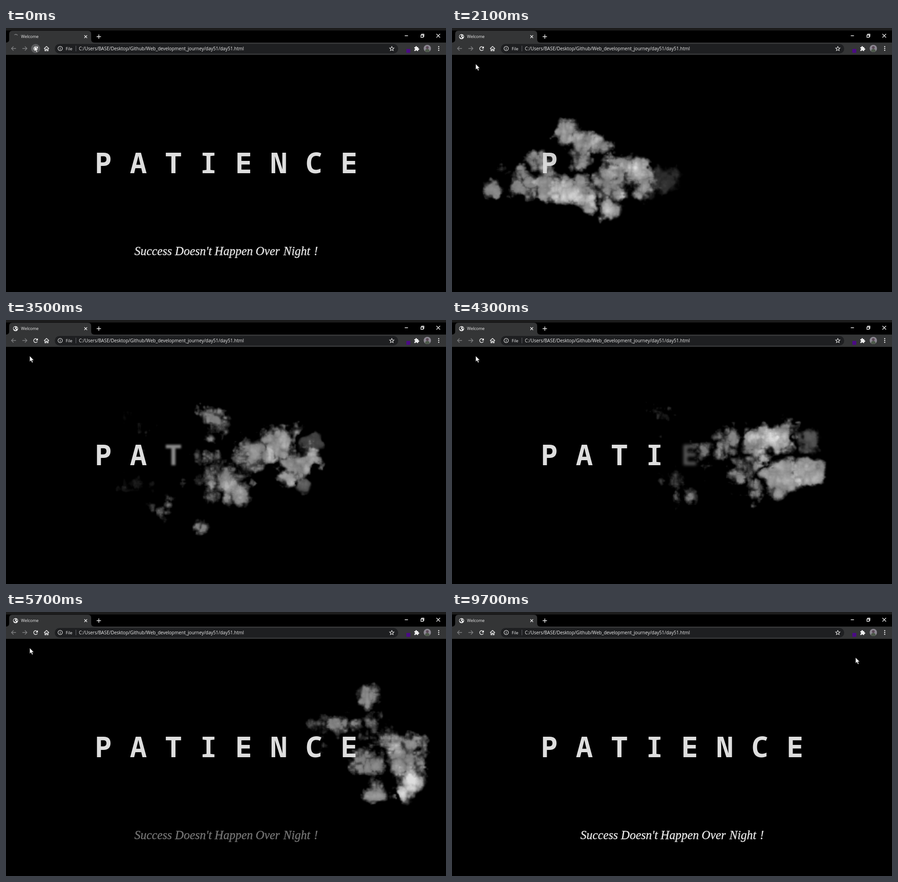
An HTML page with a canvas for the animation above (9.8 s loop, 966x580 px).

```html
<!DOCTYPE html>
<html lang="en">
<head>
<meta charset="utf-8">
<title>Welcome</title>
<style>
  html, body { margin: 0; width: 100%; height: 100%; overflow: hidden; background: #000; }
  canvas { position: absolute; left: 0; top: 130px; width: 966px; height: 350px; }
  svg { position: absolute; left: 0; top: 0; width: 966px; height: 580px; }
  .ui { font: 10px "Open Sans", sans-serif; fill: #eee; }
  .tab { font-size: 9px; font-weight: 500; }
  .line { fill: none; stroke: #eee; stroke-width: 1.4; }
  .dim { stroke: #808183; }
  #word { font: bold 62px "Noto Sans Mono", monospace; fill: #dedede; text-anchor: middle; }
  #tagline { font: italic 26.5px "Liberation Serif", serif; fill: #e6e6e6; stroke: #e6e6e6; stroke-width: .4; }
</style>
</head>
<body>
<canvas id="smoke" width="483" height="175"></canvas>
<svg viewBox="0 0 966 580">
  <g id="word"></g>
  <text id="tagline" y="499"><tspan x="282">Success</tspan> <tspan x="371">Doesn't</tspan> <tspan x="458">Happen</tspan> <tspan x="548">Over</tspan> <tspan x="609">Night</tspan> <tspan x="676">!</tspan></text>

  <g class="ui">
    <path fill="#1c1c1c" d="M0 0H966V5.5H0Z"/>
    <path fill="#343536" d="M0 32Q7 32 7 25V13Q7 6 14 6H180Q187 6 187 13V25Q187 32 194 32H966V59H0Z"/>
    <rect x="107" y="35" width="754" height="21" rx="10.5" fill="#1e1f21"/>

    <path id="spinner" class="line dim" d="M18.500 15.200Q22 12.500 25.500 16"/>
    <g id="globe">
      <circle cx="21" cy="19" r="5.500"/>
      <path fill="#343536" d="M17 16.500l3-1.500 1 2-2 2 3 1-1 3-2-2-2.500-1zM23 16l2 1v3l-2-1z"/>
    </g>
    <text class="tab" x="33" y="22">Welcome</text>
    <path class="line" d="M172 16l6 6m0-6l-6 6M199 19h9.500M203.750 14.300v9.500"/>
    <path class="line" stroke-width="1" d="M875.500 17h7M945 13l8 8m0-8l-8 8M911 15.500h5v5h-5zM912.500 15v-1.500h5v5H916"/>

    <path class="line dim" d="M22 45H12m4.500-4.500L12 45l4.500 4.500M36 45h10m-4.500-4.500L46 45l-4.500 4.500"/>
    <circle id="hover" cx="65" cy="45" r="10" fill="#5c5d5f"/>
    <path class="line" d="M69 43.500A4.300 4.300 0 1 0 69 47"/>
    <path d="M70 40v5h-5z"/>
    <path class="line" d="M83.500 45.500L89 40.500l5.500 5M85.500 44.500V50h2.200v-3.500h2.600V50h2.200v-5.500"/>
    <circle class="line" cx="119" cy="45" r="4.800" style="stroke-width:1.100"/>
    <path class="line" style="stroke-width:1.200" d="M119 44.500v3.200M119 42v1.200"/>
    <text x="131" y="48.500" style="font-size:9.300px">File</text>
    <path stroke="#66676a" d="M153.500 39v12"/>
    <text x="160" y="48.500">C:/Users/BASE/Desktop/Github/Web_development_journey/day51/day51.html</text>

    <path class="line" style="stroke-width:1.100" d="M847 40.500l1.400 3.200 3.500.3-2.700 2.300.8 3.400-3-1.800-3 1.800.8-3.400-2.700-2.300 3.500-.3z"/>
    <rect x="879" y="46" width="8.500" height="8.500" fill="#4b0a86"/>
    <path d="M896.500 42h2.500a1.700 1.700 0 1 1 3.200 0h2.800v2.800a1.700 1.700 0 1 1 0 3.200v2.500h-2.700a1.600 1.600 0 0 0-3.200 0h-2.600v-2.700a1.600 1.600 0 0 0 0-3.200z"/>
    <circle cx="925" cy="45" r="8" fill="#8b8791"/>
    <path fill="#4c5949" d="M920 51q0-5 5-5t5 5a8 8 0 0 1-10 0z"/>
    <circle cx="925" cy="43" r="3" fill="#5b4956"/>
    <circle cx="950" cy="41" r="1.300"/><circle cx="950" cy="45" r="1.300"/><circle cx="950" cy="49" r="1.300"/>
  </g>
  <path id="cursor" fill="#f4f4f4" stroke="#111" stroke-width=".6" d="M0 0V12.500L3 10 5 14.800 7.200 13.900 5.200 9.200H9Z"/>
</svg>
<script>
const LOOP = 9800, STEP = 100;
const $ = id => document.getElementById(id);
const clamp = v => Math.max(0, Math.min(1, v));
const ramp = (t, from, length) => clamp((t - from) / length);

// ---- letters ----
const starts = [1.35, 2.2, 3, 3.5, 4, 4.3, 4.6, 4.9];
const letters = [...'PATIENCE'].map((ch, i) => {
  const el = document.createElementNS('http://www.w3.org/2000/svg', 'text');
  el.setAttribute('x', 213.4 + 77.1 * i);
  el.setAttribute('y', 319);
  el.textContent = ch;
  return $('word').appendChild(el);
});

function drawText(t) {
  const loaded = t < 0.1;
  letters.forEach((el, i) => {
    const p = loaded ? 1 : ramp(t, starts[i], 0.8);
    el.style.opacity = p;
    el.style.filter = p < 1 ? `blur(${5 * (1 - p)}px)` : 'none';
  });
  $('tagline').style.opacity = loaded ? 1 : ramp(t, 5, 1.4);
}

// ---- pointer: time, x, y ----
const pointer = [
  [0, 62, 39], [0.2, 62, 39], [0.8, 52, 79], [7.6, 52, 79], [8, 132, 62],
  [8.5, 780, 34], [9, 888, 95], [9.4, 886, 100], [9.8, 886, 100]
];

function drawPointer(t) {
  const i = pointer.findIndex(k => k[0] > t);
  const [a, b] = [pointer[i - 1], pointer[i]];
  const p = ramp(t, a[0], b[0] - a[0]);
  const at = n => a[n] + (b[n] - a[n]) * p;
  $('cursor').setAttribute('transform', `translate(${at(1)} ${at(2)})`);
  $('hover').style.opacity = t < 0.4 ? 1 : 0;
  $('spinner').style.opacity = t < 0.3 ? 1 : 0;
  $('globe').style.opacity = t < 0.3 ? 0 : 1;
}

// ---- smoke: x, y, radius, life in tenths of a second ----
const puffs = [
  [85, 350, 25, 22], [112, 305, 26, 22], [150, 345, 42, 21], [182, 298, 34, 22],
  [215, 335, 42, 24], [258, 228, 34, 23], [290, 262, 42, 27], [330, 252, 28, 19],
  [285, 355, 42, 25], [297, 388, 24, 24], [350, 340, 38, 20], [375, 302, 36, 19],
  [422, 332, 52, 22], [250, 368, 30, 27], [350, 405, 34, 24], [420, 445, 28, 20],
  [452, 225, 42, 27], [478, 335, 54, 28], [448, 375, 30, 25], [510, 380, 36, 27],
  [542, 285, 48, 26], [605, 268, 46, 26], [645, 315, 52, 24], [688, 262, 42, 28],
  [722, 245, 46, 28], [665, 380, 28, 17], [732, 350, 46, 20], [790, 255, 36, 25],
  [795, 335, 42, 26], [795, 185, 34, 24], [812, 395, 34, 24], [830, 280, 36, 25],
  [880, 320, 46, 30], [890, 372, 38, 42], [862, 282, 24, 36], [893, 395, 32, 49]
].map(([x, y, r, life]) => ({
  x, y, r, life: life / 10,
  // the front slows to the right; puffs off the axis follow later
  born: 0.55 + 4 * ((x - 80) / 800) ** 1.57 + Math.abs(y - 310) / 200
}));

const N = 256;
let seed = 51;
function random() {
  seed = (seed + 0x6D2B79F5) | 0;
  let v = Math.imul(seed ^ (seed >>> 15), 1 | seed);
  v = (v + Math.imul(v ^ (v >>> 7), 61 | v)) ^ v;
  return ((v ^ (v >>> 14)) >>> 0) / 4294967296;
}

// Repeating fractal noise, scaled to 0..1
function noise(cell, billow) {
  const out = new Float32Array(N * N);
  const soft = f => f * f * (3 - 2 * f);
  for (let c = cell, amp = 1; c >= 2; c /= 2, amp *= 0.55) {
    const n = N / c;
    const grid = Float32Array.from({ length: n * n }, random);
    for (let y = 0; y < N; y++) {
      const j = Math.floor(y / c), v = soft(y / c - j);
      const top = j * n, low = ((j + 1) % n) * n;
      for (let x = 0; x < N; x++) {
        const i = Math.floor(x / c), k = (i + 1) % n, u = soft(x / c - i);
        const a = grid[top + i] * (1 - u) + grid[top + k] * u;
        const b = grid[low + i] * (1 - u) + grid[low + k] * u;
        const h = a * (1 - v) + b * v;
        out[y * N + x] += amp * (billow ? Math.abs(2 * h - 1) : h);
      }
    }
  }
  let min = Infinity, max = -Infinity;
  for (const v of out) { min = Math.min(min, v); max = Math.max(max, v); }
  return out.map(v => (v - min) / (max - min));
}

const warpX = noise(16), warpY = noise(16), billow = noise(16, true);
const { width: W, height: H } = $('smoke');
const ctx = $('smoke').getContext('2d');
const image = ctx.createImageData(W, H);
const field = new Float32Array(W * H);

function addPuff(p, t) {
  const since = t - p.born, age = since / p.life;
  if (age <= 0 || age >= 1) return;
  const R = p.r / 2 * (1.12 - 0.75 * Math.exp(-4 * since));
  const cx = (p.x + (age - 0.5) * 24) / 2;
  const cy = (180 + (p.y - 310) * (0.8 + 0.4 * age)) / 2;
  const light = Math.min(1, since / 0.3) * (0.92 - 0.5 * age) * Math.min(1, (1 - age) * 4);
  const sx = Math.round(-5 * t), sy = Math.round(4 * t);
  const reach = R * 1.5;
  const x1 = Math.min(W - 1, cx + reach), y1 = Math.min(H - 1, cy + reach);
  for (let y = Math.max(0, Math.floor(cy - reach)); y <= y1; y++) {
    for (let x = Math.max(0, Math.floor(cx - reach)); x <= x1; x++) {
      const k = ((y + sy) & 255) * N + ((x + sx) & 255);
      const dx = x - cx + (warpX[k] - 0.5) * R * 1.2;
      const dy = y - cy + (warpY[k] - 0.5) * R * 1.2;
      const core = 1 - (dx * dx + dy * dy) / (R * R);
      if (core <= 0) continue;
      const b = billow[k];
      const d = clamp(core * 1.8 + Math.min(1, core * 4) * (b - 0.4) * (1 + 2 * age) - 2.2 * age * age);
      const v = d * light * (0.36 + 0.3 * core + 0.55 * b);
      const i = y * W + x, old = field[i];
      field[i] = Math.max(old, v) + 0.22 * Math.min(old, v);
    }
  }
}

function drawSmoke(t) {
  field.fill(0);
  puffs.forEach(p => addPuff(p, t));
  for (let i = 0; i < field.length; i++) {
    image.data.fill(222, i * 4, i * 4 + 3);
    image.data[i * 4 + 3] = 255 * clamp(field[i]);
  }
  ctx.putImageData(image, 0, 0);
}

// ---- clock ----
const begin = performance.now();
let last = -1;
function frame() {
  const step = Math.floor((performance.now() - begin) % LOOP / STEP);
  if (step !== last) {
    last = step;
    const t = step * STEP / 1000;
    drawText(t);
    drawPointer(t);
    drawSmoke(t);
  }
  requestAnimationFrame(frame);
}
frame();
</script>
</body>
</html>
```
